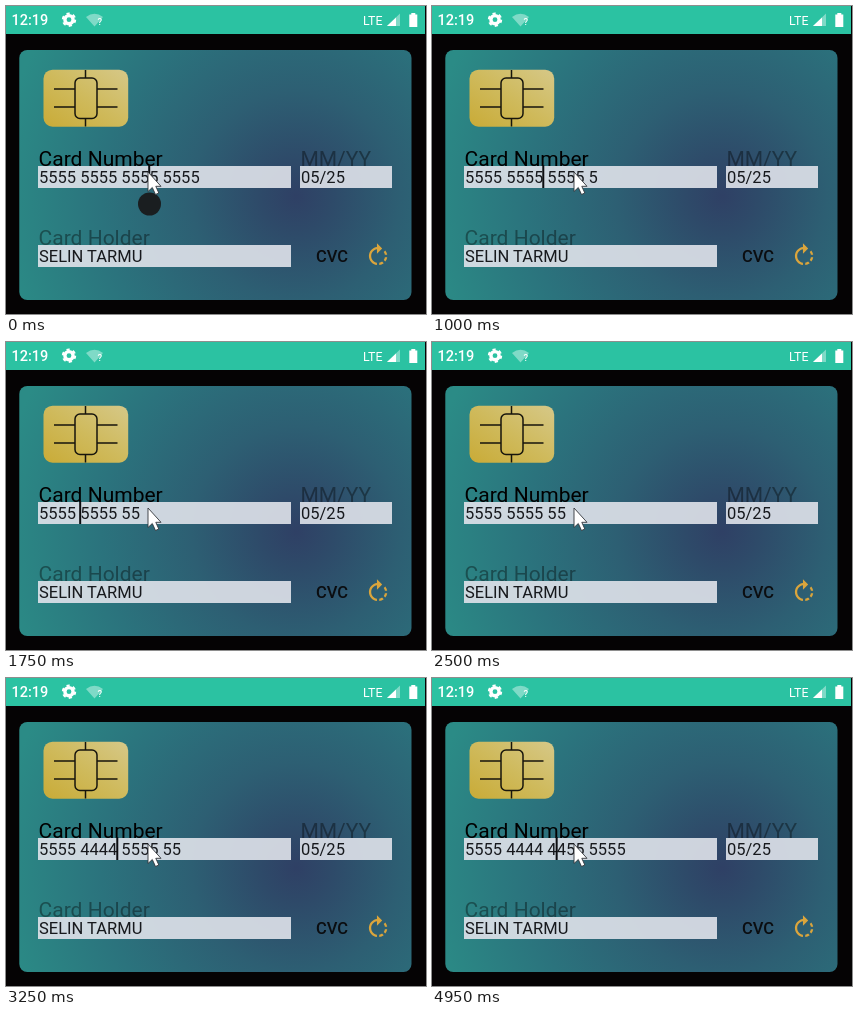
Write an HTML page that moves like this. It is 420 px wide and 308 px high and loops after 5050 ms.

```html
<!DOCTYPE html>
<html lang="en">
<head>
<meta charset="utf-8">
<title>Card number input</title>
<style>
  html, body { margin: 0; width: 100%; height: 100%; overflow: hidden; background: #050304; }
  svg { display: block; width: 420px; height: 308px; }
  text { font-family: Roboto, Arial, sans-serif; white-space: pre; }
  .label { font-size: 21px; }
  .dim { fill-opacity: .38; }
  .box { fill: #dfe2ea; fill-opacity: .91; }
  .value { font-size: 16.5px; fill: #17191d; }
  .status { fill: #fff; }
</style>
</head>
<body>
<svg viewBox="0 0 420 308">
  <defs>
    <radialGradient id="sea" gradientUnits="userSpaceOnUse" cx="290" cy="190" r="300">
      <stop offset="0" stop-color="#2f4065"/>
      <stop offset=".12" stop-color="#2e4a69"/>
      <stop offset=".35" stop-color="#2d5f73"/>
      <stop offset=".65" stop-color="#2b737d"/>
      <stop offset="1" stop-color="#2b8b86"/>
    </radialGradient>
    <linearGradient id="gold" x1="0" y1="1" x2="1" y2="0">
      <stop offset="0" stop-color="#c9ab37"/>
      <stop offset=".5" stop-color="#cfba5c"/>
      <stop offset="1" stop-color="#d6c888"/>
    </linearGradient>
  </defs>

  <!-- status bar -->
  <rect width="419" height="28" fill="#2bc2a2"/>
  <text class="status" x="5.500" y="19" font-size="14.500" font-weight="500">12:19</text>
  <g fill="none" stroke="#fff">
    <circle cx="63" cy="13.700" r="4.100" stroke-width="3.400"/>
    <circle cx="63" cy="13.700" r="6.200" stroke-width="2" stroke-dasharray="3.200 3.293"/>
  </g>
  <path d="M80 11Q88.500 4.500 97 11L88.500 20.500Z" fill="#fff" fill-opacity=".4"/>
  <text class="status" x="91.500" y="19" font-size="9.500" font-weight="500">?</text>
  <text class="status" x="357" y="18.700" font-size="12.400">LTE</text>
  <path d="M394 7.500V20H381Z" fill="#fff" fill-opacity=".4"/>
  <path d="M390 11.500V20H381Z" fill="#fff"/>
  <path d="M405.300 7h4v1.500h2V21h-8V8.500h2Z" fill="#fff"/>

  <!-- card -->
  <rect x="13.300" y="44" width="392.200" height="250" rx="8" fill="url(#sea)"/>
  <rect x="37.500" y="63.700" width="84.700" height="57" rx="9" fill="url(#gold)"/>
  <g fill="none" stroke="#17150c" stroke-width="1.500">
    <rect x="69" y="72" width="22" height="40.500" rx="5"/>
    <path d="M48 83H69M48 101H69M91 83H111.500M91 101H111.500M79.500 64V72M79.500 112.500V120.500"/>
  </g>

  <text class="label" x="32.600" y="159.500">Card Number</text>
  <text class="label dim" x="294.400" y="159.500">MM/YY</text>
  <text class="label dim" x="32.600" y="238.500">Card Holder</text>
  <rect class="box" x="32" y="160" width="253" height="22"/>
  <rect class="box" x="294" y="160" width="92" height="22"/>
  <rect class="box" x="32" y="239" width="253" height="22"/>
  <text class="value" id="number" x="33" y="177"></text>
  <text class="value" x="295" y="177">05/25</text>
  <text class="value" x="33" y="256">SELIN TARMU</text>
  <text x="310" y="256" font-size="16.500" font-weight="500" fill="#0b0d10">CVC</text>
  <path transform="translate(358.300 236.200) scale(1.150)" fill="#dba53c" d="M15.550 5.550L11 1v3.070C7.060 4.560 4 7.920 4 12s3.050 7.440 7 7.930v-2.020c-2.840-.48-5-2.940-5-5.910s2.160-5.430 5-5.910V10zM19.930 11c-.17-1.390-.72-2.730-1.620-3.890l-1.420 1.420c.54.75.88 1.600 1.020 2.470zM13 17.900v2.020c1.390-.17 2.740-.71 3.900-1.610l-1.440-1.440c-.75.54-1.590.89-2.460 1.030zm3.890-2.420l1.420 1.410c.9-1.160 1.450-2.500 1.620-3.890h-2.020c-.14.87-.48 1.720-1.020 2.480z"/>

  <circle id="touch" cx="143.500" cy="198" r="11.500" fill="#1a1e20"/>
  <rect id="caret" y="159" width="2" height="23" fill="#0c0d10"/>
  <path d="M142 166v19.500l4.300-4 3.200 7 3.300-1.500-3-6.700h5.200Z" fill="#fff" stroke="#33363b" stroke-width=".9"/>
</svg>
<script>
const LOOP = 5050, BLINK = 500;

// Key presses: time, typed fours, fives after them, caret index
const keys = [
  [0, 0, 12, 13], [500, 0, 11, 12], [650, 0, 10, 11], [800, 0, 9, 10],
  [950, 0, 9, 9], [1100, 0, 8, 8], [1200, 0, 7, 7], [1300, 0, 7, 6], [1550, 0, 6, 5],
  [2650, 1, 6, 6], [2800, 2, 6, 7], [3000, 3, 6, 8], [3200, 4, 6, 9],
  [3400, 5, 6, 10], [3600, 6, 6, 11]
];

const [number, caret, touch] = ['number', 'caret', 'touch'].map(id => document.getElementById(id));

function draw(t) {
  const [start, fours, fives, index] = keys.findLast(key => key[0] <= t);
  const digits = '5555' + '4'.repeat(fours) + '5'.repeat(fives);
  const text = digits.replace(/.{4}(?=.)/g, '$& ');
  if (number.textContent !== text) number.textContent = text;

  const blinkOn = Math.floor((t - start) / BLINK) % 2 === 0;
  caret.setAttribute('opacity', blinkOn ? 1 : 0);
  caret.setAttribute('x', 32 + number.getSubStringLength(0, index));
  touch.setAttribute('opacity', Math.max(0, Math.min(1, (675 - t) / 175)));
}

const origin = performance.now();
function tick() {
  draw((performance.now() - origin) % LOOP);
  requestAnimationFrame(tick);
}
tick();
</script>
</body>
</html>
```
